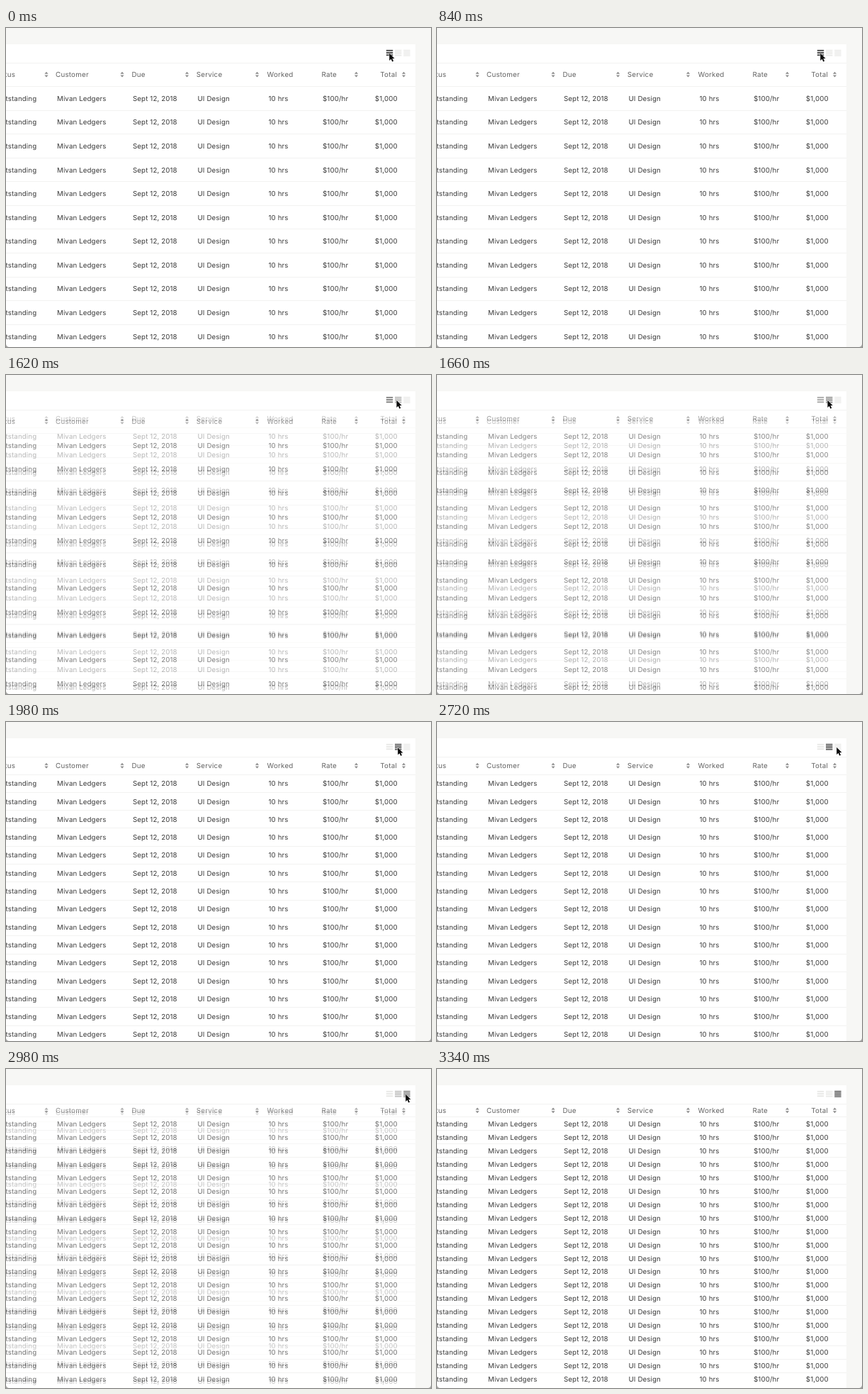
Animation of 600 by 450 pixels, one loop 3.6 s. Source, as an HTML page:

```html
<!DOCTYPE html>
<html lang="en">
<head>
<meta charset="utf-8">
<title>Table density</title>
<style>
  html, body { margin: 0; width: 100%; height: 100%; overflow: hidden; background: #f7f7f5; }
  svg { display: block; width: 600px; height: 450px; }
  text { font: 400 9.7px Inter, "Open Sans", sans-serif; letter-spacing: .13px; fill: #3a3a3a; text-rendering: geometricPrecision; }
  .head { font-size: 9.8px; letter-spacing: .22px; fill: #626262; }
  .line { stroke: #f2f2f1; stroke-width: 1; }
  .sort { fill: #8c8c8c; }
</style>
</head>
<body>
<svg id="stage" viewBox="0 0 600 450"></svg>
<script>
const LOOP = 3600;
const stage = document.getElementById('stage');

const columns = [
  { title: 'Status', value: 'Outstanding', headX: 13.2, x: 43.2, anchor: 'end', sort: 57 },
  { title: 'Customer', value: 'Mivan Ledgers', headX: 70, x: 72, sort: 164 },
  { title: 'Due', value: 'Sept 12, 2018', headX: 177.5, x: 179, sort: 255.5 },
  { title: 'Service', value: 'UI Design', headX: 268.8, x: 270.5, sort: 354.5 },
  { title: 'Worked', value: '10 hrs', headX: 368.5, x: 370.5 },
  { title: 'Rate', value: '$100/hr', headX: 445.5, x: 447, sort: 494.5 },
  { title: 'Total', value: '$1,000', headX: 552, x: 552.7, anchor: 'end', sort: 561.5 }
];

const densities = [
  { headY: 65.6, firstY: 99.3, pitch: 33.57 },
  { headY: 61.6, firstY: 86.7, pitch: 25.3 },
  { headY: 58.4, firstY: 77.4, pitch: 18.96 }
];

function add(parent, tag, attrs, content) {
  const node = document.createElementNS('http://www.w3.org/2000/svg', tag);
  for (const key in attrs) node.setAttribute(key, attrs[key]);
  if (content) node.textContent = content;
  parent.append(node);
  return node;
}

const addText = (parent, content, x, midY, anchor = 'start', cls = '') =>
  add(parent, 'text', { x, y: midY + 3.5, 'text-anchor': anchor, class: cls }, content);

const addLine = (parent, y) =>
  add(parent, 'path', { d: `M0 ${Math.round(y) + .5}H578`, class: 'line' });

function addIcon(parent, index, active) {
  const bars = index + 3;
  const step = 9.6 / bars;
  for (let i = 0; i < bars; i++) {
    add(parent, 'rect', {
      x: 536.8 + index * 12.2, y: 30.8 + i * step, width: 9.4, height: step * .62,
      fill: active ? '#4c4c4c' : '#e9e9e7'
    });
  }
}

function buildLayer({ headY, firstY, pitch }, active) {
  const layer = add(stage, 'g', {});
  add(layer, 'rect', { y: 23, width: 578, height: 427, fill: '#fff' });
  addLine(layer, 49);
  densities.forEach((_, i) => addIcon(layer, i, i === active));

  for (const c of columns) {
    addText(layer, c.title, c.headX, headY, c.anchor, 'head');
    if (c.sort) {
      add(layer, 'path', {
        d: `M${c.sort - 2.6} ${headY - .9}h5.2l-2.6 -2.9zm0 1.8h5.2l-2.6 2.9z`,
        class: 'sort'
      });
    }
  }
  for (let y = firstY; y < 455; y += pitch) {
    addLine(layer, y - pitch / 2 - .5);
    for (const c of columns) addText(layer, c.value, c.x, y, c.anchor);
  }
  return layer;
}

const layers = densities.map(buildLayer);

// Rounded window corners
add(stage, 'path', { d: 'M0 445.5V450H4.5A4.5 4.5 0 0 1 0 445.5ZM600 445.5V450H595.5A4.5 4.5 0 0 0 600 445.5Z', fill: '#a5a5a3' });

const cursor = add(stage, 'path', {
  d: 'M0 0V10.2L2.4 8 4 11.7 5.8 10.9 4.2 7.3H7.3Z',
  fill: '#0a0a0a', stroke: '#fff', 'stroke-width': .8, 'paint-order': 'stroke'
});

const clamp = v => Math.min(1, Math.max(0, v));
const easeOut = v => 1 - (1 - v) ** 3;
const easeInOut = v => v * v * (3 - 2 * v);
const easeIn = v => v * v;

const fades = [{ layer: layers[1], start: 1580 }, { layer: layers[2], start: 2880 }];
const FADE = 300;

const moves = [
  { start: 820, end: 1340, dx: 10.2, dy: 0, dip: 1.2, ease: easeInOut },
  { start: 1920, end: 2180, dx: 12.8, dy: 0, dip: .8, ease: easeInOut },
  { start: 3020, end: 3330, dx: 12, dy: -50, dip: 0, ease: easeIn }
];

function render(t) {
  for (const f of fades) {
    f.layer.setAttribute('opacity', easeOut(clamp((t - f.start) / FADE)));
  }
  let x = 541.2, y = 35.8;
  for (const m of moves) {
    const p = m.ease(clamp((t - m.start) / (m.end - m.start)));
    x += m.dx * p;
    y += m.dy * p + m.dip * Math.sin(Math.PI * p);
  }
  cursor.setAttribute('transform', `translate(${x} ${y})`);
}

const began = performance.now();
function tick() {
  render((performance.now() - began) % LOOP);
  requestAnimationFrame(tick);
}
tick();
</script>
</body>
</html>
```
